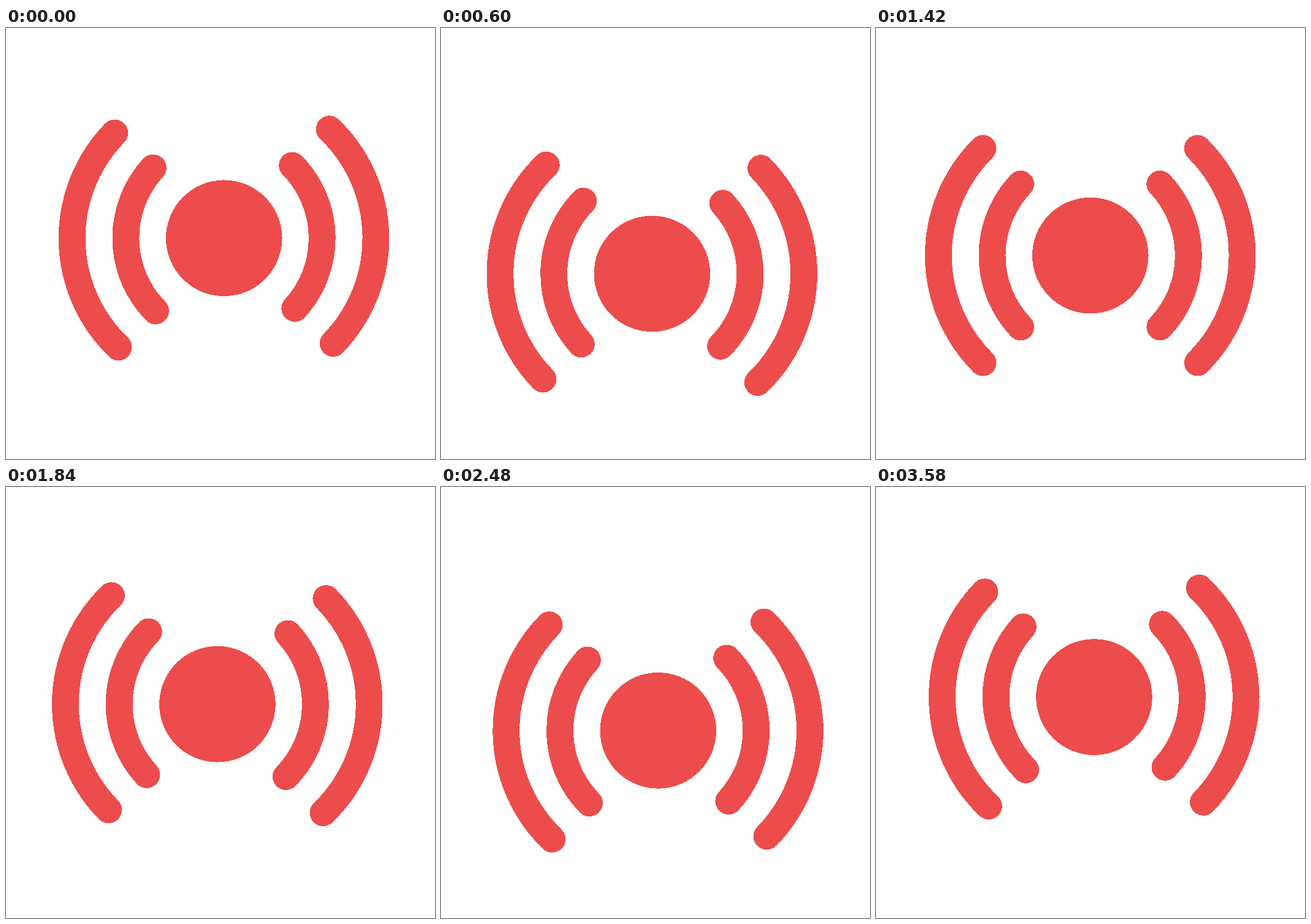
An HTML page for the animation above (3.6 s loop, 700 by 704 pixels).

```html
<!DOCTYPE html>
<html>
<head>
<meta charset="utf-8">
<style>
  html, body { margin: 0; width: 100%; height: 100%; overflow: hidden; background: #fff; }
  svg { display: block; }
</style>
</head>
<body>
<svg width="700" height="704" viewBox="0 0 700 704" shape-rendering="crispEdges">
  <g id="signal">
    <g transform="translate(349.7 344)" fill="none" stroke="#ed4c4c" stroke-width="43.8" stroke-linecap="round">
      <circle r="94.8" fill="#ed4c4c" stroke="none"/>
      <path d="M-175.3-175A247 247 0 0 0-175.3 175M175-175A247 247 0 0 1 175 175"/>
      <path d="M-113.8-116.8A170 170 0 0 0-113.8 116.8M113.5-116.8A170 170 0 0 1 113.5 116.8"/>
    </g>
  </g>
</svg>
<script>
const LOOP = 3600;
const signal = document.getElementById('signal');

// Cosine of a wave that runs the given number of cycles per loop
const wave = (t, cycles, lead = 0) =>
  Math.cos(2 * Math.PI * cycles * t / LOOP + lead * Math.PI / 180);

// Bobs twice and swings three times per loop, hinged at the top left corner
function draw() {
  const t = performance.now() % LOOP;
  const bob = 36 - 30.5 * wave(t, 2, 1.5);
  const tilt = -1.01 * wave(t, 3, 20) - .07 * wave(t, 6);
  signal.setAttribute('transform', `translate(0 ${bob}) rotate(${tilt})`);
  requestAnimationFrame(draw);
}
draw();
</script>
</body>
</html>
```
